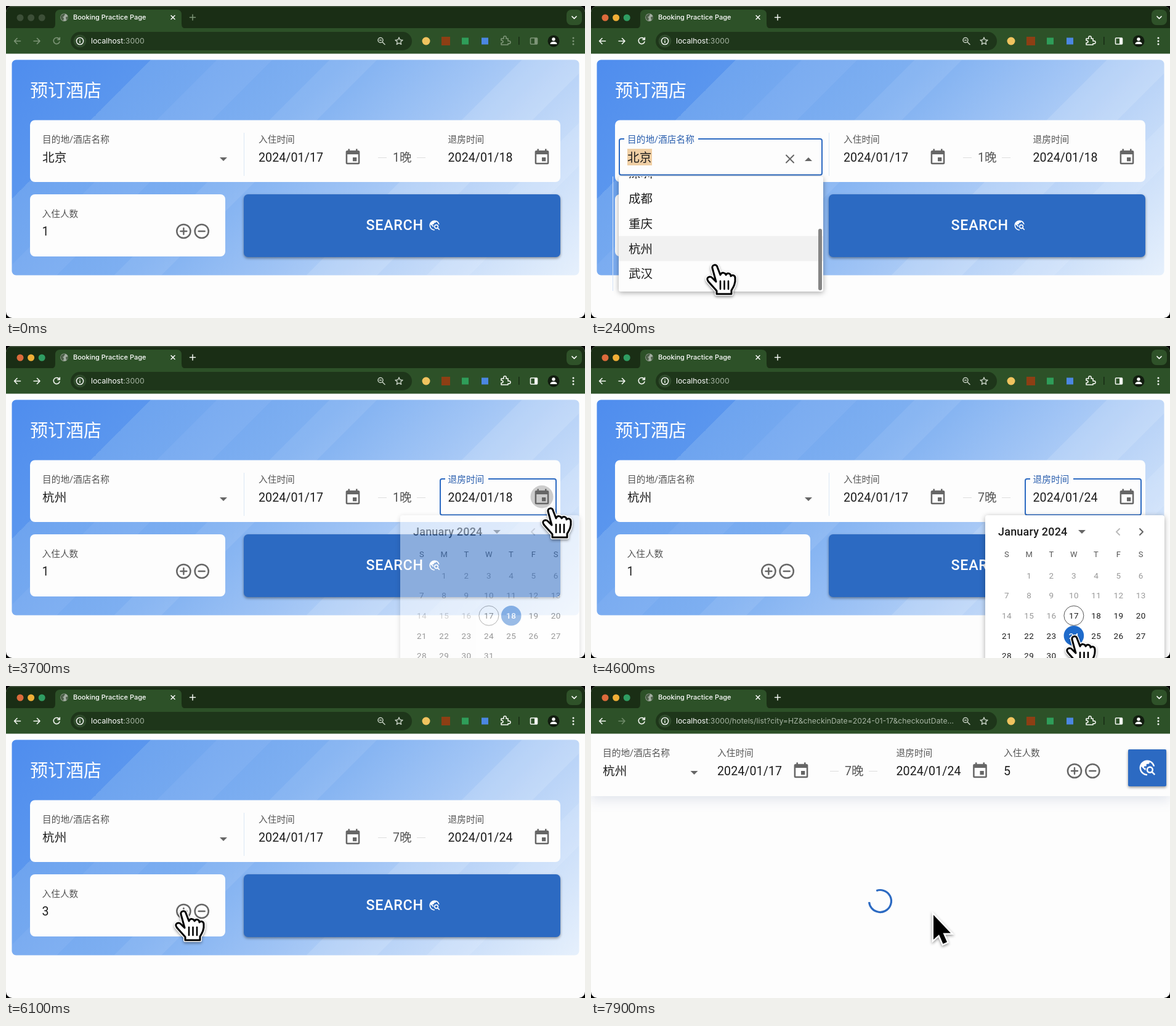
Recreate the animation shown at these times as an HTML page. Size 940 by 507 pixels, loop 8 s.

```html
<!DOCTYPE html>
<html lang="zh-CN">
<head>
<meta charset="utf-8">
<style>
html, body { margin: 0; width: 100%; height: 100%; overflow: hidden; background: #000 }
svg { display: block; width: 100vw; height: 100vh; border-radius: 10px;
  font-family: Roboto, "Noto Sans CJK SC", "Noto Sans CJK", sans-serif }
.ui { font-family: Inter, sans-serif }
.line { fill: none; stroke-linecap: round; stroke-linejoin: round }
.lift { filter: drop-shadow(0 2px 2px #0006) }
.paper { filter: drop-shadow(0 2px 4px #0005) }
</style>
</head>
<body>
<svg id="stage" viewBox="0 0 940 507"></svg>
<script>
const LOOP = 8000, BLUE = '#2c6ac2', GREY = '#666', INK = '#1c1c1c', WHITE = '#fdfdfd';
const cities = ['北京', '上海', '广州', '深圳', '成都', '重庆', '杭州', '武汉'];

// [time, x, y] of the pointer's hot spot
const track = [[100, 420, 480], [900, 218, 270], [1000, 218, 270], [1200, 205, 350], [1400, 205, 350],
  [1600, 199, 380], [2100, 199, 380], [2400, 200, 421], [2700, 202, 398], [2900, 202, 398],
  [3400, 868, 246], [3600, 872, 250], [3700, 883, 264], [4400, 784, 472], [4700, 784, 472],
  [5300, 478.5, 330.5], [5600, 287, 366], [6600, 287, 366], [7000, 544, 361], [7100, 571, 380], [7300, 556, 372]];
const shapes = [[0, 'arrow'], [1000, 'beam'], [1100, 'hand'], [2900, 'arrow'], [3400, 'hand'], [4800, 'arrow'],
  [5100, 'hand'], [5500, 'arrow'], [5600, 'hand'], [6700, 'arrow'], [6800, 'hand'], [7200, 'arrow']];
const scrolling = [[1700, 0], [1900, 154]];
const fading = [[3500, 0], [3700, .45], [3900, 1], [4600, 1], [4900, 0]];
const guests = [[0, 1], [5800, 2], [6000, 3], [6200, 4], [6500, 5]];

const EVENT = 'M17 12h-5v5h5zM16 1v2H8V1H6v2H5a2 2 0 0 0-2 2v14a2 2 0 0 0 2 2h14a2 2 0 0 0 2-2V5a2 2 0 0 0-2-2h-1V1zm3 18H5V8h14z';
const EXPLORE = 'M19.3 16.9c.4-.7.7-1.5.7-2.4 0-2.5-2-4.5-4.5-4.5S11 12 11 14.5s2 4.5 4.5 4.5c.9 0 1.7-.3 2.4-.7l3.2 3.2 1.4-1.4zm-3.8.1a2.5 2.5 0 1 1 0-5 2.5 2.5 0 0 1 0 5zM12 20v2C6.5 22 2 17.5 2 12S6.5 2 12 2c4.8 0 8.9 3.4 9.8 8h-2.1c-.6-2.5-2.4-4.5-4.7-5.4V5a2 2 0 0 1-2 2h-2v2c0 .6-.4 1-1 1H8v2h2v3H9l-4.8-4.8C4.1 10.8 4 11.4 4 12c0 4.4 3.6 8 8 8z';
const HAND = 'M-3 5C-4-1 4-2 5 3L10 16C12 11 18 12 19 16C21 12 27 13 27 18C30 15 34 17 34 21C35 30 31 36 28 41V47H4V42C0 37-6 31-10 26C-14 20-7 17-3 21L3 27Z';
const BEAM = 'M-9-23Q0-23 0-15V15Q0 23-9 23M9-23Q0-23 0-15M9 23Q0 23 0 15M-4 0H4';

const latest = (list, t) => list.filter(k => k[0] <= t).pop()[1];
function tween(keys, t, i = 1) {
  const n = keys.findIndex(k => k[0] > t);
  if (n < 0) return keys[keys.length - 1][i];
  if (!n) return keys[0][i];
  const a = keys[n - 1], b = keys[n];
  return a[i] + (b[i] - a[i]) * (t - a[0]) / (b[0] - a[0]);
}

const rect = (x, y, w, h, fill, r = 0, more = '') =>
  `<rect x="${x}" y="${y}" width="${w}" height="${h}" rx="${r}" fill="${fill}" ${more}/>`;
const disc = (x, y, r, fill, more = '') => `<circle cx="${x}" cy="${y}" r="${r}" fill="${fill}" ${more}/>`;
const line = (d, color, w = 1.6) => `<path class="line" d="${d}" stroke="${color}" stroke-width="${w}"/>`;
const text = (x, y, size, s, fill = INK, more = '') =>
  `<text x="${x}" y="${y}" font-size="${size}" fill="${fill}" ${more}>${s}</text>`;
const icon = (d, x, y, k, fill) => `<path transform="translate(${x} ${y}) scale(${k}) translate(-12 -12)" d="${d}" fill="${fill}"/>`;
const caret = (x, y, up) => `<path d="M${x - 6} ${y + (up ? 3 : -3)}h12l-6 ${up ? -6 : 6}z" fill="${GREY}"/>`;
const calendar = (x, y) => icon(EVENT, x, y + 1, 1.26, GREY);

function field(x, y, label, value, focused) {
  return text(x, y + 5.3, 14.7, label, focused ? '#2b5fae' : '#555') +
    text(x, y + 35.7, 19.6, value, INK, 'letter-spacing=".08"');
}
function outline(x, w, gap, gapWidth) {
  return rect(x + 1, 216, w - 2, 58.5, 'none', 3, `stroke="${BLUE}" stroke-width="2"`) + rect(gap, 214, gapWidth, 4, WHITE);
}
function nights(x, y, n) {
  return rect(x - 24, y, 14, 1, '#ddd') + rect(x + 39, y, 14, 1, '#ddd') + text(x, y + 7, 19.6, n + '晚', '#555');
}
function stepper(x, y) {
  const ring = cx => disc(cx, y, 11.1, 'none', `stroke="${GREY}" stroke-width="2.5"`);
  return ring(x) + ring(x + 29.3) + line(`M${x - 5} ${y}h10m-5-5v10M${x + 24.3} ${y}h10`, GREY, 2.4);
}

function browser(t, done) {
  const on = t >= 1000, c = on ? '#f4f7f2' : '#7d9577', off = '#6f8a69';
  const lights = on ? ['#dc6a3c', '#f0ae37', '#2f9c62'] : Array(3).fill('#3d4f38');
  const url = ':3000' + (done ? '/hotels/list?city=HZ&amp;checkinDate=2024-01-17&amp;checkoutDate...' : '');
  return rect(0, 0, 940, 37, '#1a2e15') + rect(0, 0, 940, 1.4, '#4b5a47') +
    `<path d="M72 37q8 0 8-8V14q0-8 8-8h189q8 0 8 8v15q0 8 8 8z" fill="#2d5128"/>` +
    rect(0, 36, 940, 41.5, '#2d5128') +
    lights.map((f, i) => disc(23 + 17.6 * i, 19, 5.5, f)).join('') +
    disc(94.5, 18.5, 6.3, '#a3ada1') +
    `<path d="M89 16q5-5 7-3l-2 4-2 1 2 2-1 4q-5-2-4-8zM97 18l4-1q0 4-3 6z" fill="#4c5f48"/>` +
    text(109, 22.3, 11, 'Booking Practice Page', '#fff', 'class="ui" font-weight="500"') +
    line('M268 15.5l6 6m0-6l-6 6', '#fff', 1.5) + line('M298.5 18.5h9m-4.5-4.5v9', c, 1.5) +
    rect(910, 6, 25, 25, '#2f5229', 8) + line('M919 17l3.5 3.5 3.5-3.5', '#fff', 1.7) +
    line('M23.5 57h-10m4.5-4.5l-4.5 4.5 4.5 4.5', c) +
    line('M45 57h10m-4.5-4.5l4.5 4.5-4.5 4.5', done ? off : c) +
    line('M86.5 54a5 5 0 1 0 .5 4M87.3 51.3v3.5h-3.5', c) +
    rect(105, 42, 554, 30, '#1e361a', 15) + disc(120, 57, 10.5, '#2f4b2b') +
    disc(120, 57, 5.6, 'none', 'stroke="#fff" stroke-width="1.4"') + line('M120 56.5v3M120 54.2v.1', '#fff', 1.4) +
    text(138, 61, 12.25, `localhost<tspan fill="#a7b5a3">${url}</tspan>`, '#fff', 'class="ui"') +
    disc(608, 55.5, 4, 'none', 'stroke="#c6d0c3" stroke-width="1.5"') + line('M611 58.5l4 4M606.5 55.5h3', '#c6d0c3', 1.5) +
    line('M638 51l1.7 4 4.3.4-3.3 2.8 1 4.2-3.7-2.2-3.7 2.2 1-4.2-3.3-2.8 4.3-.4z', '#c6d0c3', 1.4) +
    disc(682, 57, 6.5, '#f0c35f') + rect(707, 50, 14, 14, '#8d3f14') +
    rect(740, 51.5, 11, 11, '#2f9d59') + rect(772, 51.5, 11, 11, '#4b87e2') +
    line('M804 53h4q-1-4 2-4t2 4h3v4q4-1 4 2t-4 2v2h-11v-3q3 0 3-2t-3-2z', c, 1.6) +
    rect(832, 50, 1.5, 13, '#182b14') +
    rect(851.5, 52, 11, 10, 'none', 1, `stroke="${c}" stroke-width="1.6"`) + rect(858, 52, 5, 10, c) +
    disc(889, 57, 9.5, '#111c0f') + disc(889, 54, 2.7, '#fff') + '<path d="M883.5 62q0-4 5.5-4t5.5 4z" fill="#fff"/>' +
    [52, 57, 62].map(y => disc(921, y, 1.5, c)).join('');
}

// Colour and bands run along x + y: [sum, colour] and [start, end, strength]
const sky = [[97, '#4f8dee'], [323, '#5a96ee'], [323, '#6ea4ef'], [640, '#7fb0f1'], [870, '#a0c4f5'], [1019, '#b7d2f7'], [1369, '#e6f0fc']];
const bands = [[430, 520, .05], [613, 690, .08], [925, 1040, .13], [1120, 1190, .1]];
const hero = '<defs><linearGradient id="sky" gradientUnits="userSpaceOnUse" x1="9" y1="88" x2="645" y2="724">' +
  sky.map(([s, c]) => `<stop offset="${(s - 97) / 1272}" stop-color="${c}"/>`).join('') + `</linearGradient>
<clipPath id="panel">${rect(9.5, 87.5, 921, 350, '#000', 7)}</clipPath>
<clipPath id="menu">${rect(45, 277, 332, 187, '#000', 3)}</clipPath></defs><g clip-path="url(#panel)">` +
  rect(9, 87, 922, 351, 'url(#sky)') +
  bands.map(([a, b, o]) => `<path d="M${a - 87} 87H${b - 87}L${b - 438} 438H${a - 438}z" fill="#fff" opacity="${o}"/>`).join('') + '</g>' +
  text(39, 148, 29, '预订酒店', '#fff');

function cityMenu(t) {
  const top = tween(scrolling, t), hover = t < 1100 ? 0 : t < 1400 ? 1 : t < 1800 ? 2 : 6;
  const rows = cities.map((city, i) => {
    const y = 304 + 40.7 * i - top, bg = i == 0 ? '#dfe8f3' : i == hover ? '#f1f1f1' : 'none';
    return rect(45, y - 20.35, 332, 40.7, bg) + text(61, y + 7.3, 19.5, city);
  }).join('');
  return rect(35, 277, 1, 186, '#d3e2f7') + rect(45, 277, 332, 187, WHITE, 3, 'class="paper"') +
    `<g clip-path="url(#menu)">${rows}${t >= 1800 ? rect(369, 278 + 84 * top / 154, 6, 100, '#858585', 3) : ''}</g>`;
}

function datePopup(opacity, picked) {
  const mid = 'text-anchor="middle" letter-spacing=".4"';
  let out = rect(640, 275, 291, 310, '#fff', 4, 'class="paper"') +
    text(661, 308, 18, 'January 2024', INK, 'font-weight="500" letter-spacing=".2"') + caret(797, 302) +
    line('M858 297l-5 5 5 5', '#bbb', 2) + line('M891 297l5 5-5 5', GREY, 2);
  [...'SMTWTFS'].forEach((d, i) => out += text(675 + 36.3 * i, 343, 13, d, '#555', mid));
  for (let d = 1; d <= 31; d++) {
    const x = 675 + 36.3 * (d % 7), y = 373 + 32.6 * (d / 7 | 0);
    if (d == picked) out += disc(x, y, 16.3, '#1f6bcb');
    else if (d == 17) out += disc(x, y, 16, 'none', 'stroke="#555"');
    out += text(x, y + 4.8, 13.5, d, d == picked ? '#fff' : d < 17 ? '#999' : INK, mid + (d == picked ? ' font-weight="500"' : ''));
  }
  return `<g opacity="${opacity}">${out}</g>`;
}

function home(t) {
  const choosing = t >= 1000 && t < 2900, dating = t >= 3400 && t < 4900, later = t >= 4600;
  const over = (t >= 5100 && t < 5500) || t >= 6800;
  const fade = tween(fading, t);
  return hero + rect(39, 185.5, 861, 100.5, WHITE, 8) + rect(386, 206, 1, 70, '#dbe7f5') +
    (choosing ? outline(45, 331, 54, 120) + rect(59, 232, 40, 27, '#f0cfa4') + line('M317 242.5l12 12m0-12l-12 12', GREY, 2) : '') +
    field(59, 217, '目的地/酒店名称', t < 2900 ? '北京' : '杭州', choosing) + caret(353, 249, choosing) +
    field(410, 217, '入住时间', '2024/01/17') + calendar(563, 245) + nights(628, 246, later ? 7 : 1) +
    (dating ? outline(704, 190, 713, 70) : '') + (t >= 3400 && t < 4000 ? disc(870, 245, 18.5, '#ccc') : '') +
    field(717.5, 217, '退房时间', later ? '2024/01/24' : '2024/01/18', dating) + calendar(870, 245) +
    rect(39, 306, 317, 101, WHITE, 8) + field(58.5, 337.5, '入住人数', latest(guests, t)) + stepper(288.4, 366) +
    rect(386, 306, 514, 102, t >= 6900 ? '#2558b0' : over ? '#2963bd' : BLUE, 7, 'class="lift"') +
    (t == 7100 ? disc(544, 361, 7.5, '#406fb0') : '') +
    text(584.5, 364.3, 23.3, 'SEARCH', '#fff', 'font-weight="500" letter-spacing=".7"') + icon(EXPLORE, 695.7, 356.5, .82, '#fff') +
    (choosing ? cityMenu(t) : '') + (fade ? datePopup(fade, later ? 24 : 18) : '');
}

function spinner(t) {
  const u = (t - 7130) / 1400 % 1, smooth = v => v * v * (3 - 2 * v);
  const a = smooth(Math.min(1, u * 2)), b = smooth(Math.max(0, u * 2 - 1));
  return `<g transform="translate(469.5 349.5) scale(.89) rotate(${360 * u})">` +
    disc(0, 0, 20.2, 'none', `stroke="${BLUE}" stroke-width="3.6" stroke-dasharray="${1 + 99 * a} 200" stroke-dashoffset="${-15 * a - 110 * b}"`) + '</g>';
}

function results(t) {
  return rect(0, 77, 940, 102, WHITE, 0, 'style="filter:drop-shadow(0 6px 10px #3c5a8c26)"') +
    field(19, 109, '目的地/酒店名称', '杭州') + caret(167.5, 141) +
    field(205, 109, '入住时间', '2024/01/17') + calendar(341, 137) + nights(412, 138, 7) +
    field(495.5, 109, '退房时间', '2024/01/24') + calendar(631.5, 137) +
    field(670, 109, '入住人数', '5') + stepper(785, 138) +
    rect(872, 103, 62, 60, BLUE, 2, 'class="lift"') + icon(EXPLORE, 903, 133, 1.25, '#fff') + spinner(t);
}

function pointer(t) {
  if (t < 100) return '';
  const art = {
    arrow: '<path d="M0 0V40L9 32L15.5 47L22 44L15.5 29.5H28Z" stroke="#fff" stroke-width="5" paint-order="stroke"/>',
    beam: line(BEAM, '#fff', 8) + line(BEAM, '#000', 4),
    hand: line(HAND, '#fff', 6) + `<path d="${HAND}" fill="#fff" stroke="#000" stroke-width="3" stroke-linejoin="round"/>` +
      line('M10 26v13M16.5 26v13M23 26v13', '#000', 2.6)
  };
  return `<g class="lift" transform="translate(${tween(track, t, 1)} ${tween(track, t, 2)})">${art[latest(shapes, t)]}</g>`;
}

const stage = document.getElementById('stage');
let shown = -1;
function draw() {
  const t = Math.floor(performance.now() % LOOP / 100) * 100;
  if (t != shown) {
    const done = t >= 7200;
    stage.innerHTML = rect(0, 0, 940, 507, WHITE) + (done ? results(t) : home(t)) + browser(t, done) + pointer(t);
    shown = t;
  }
  requestAnimationFrame(draw);
}
draw();
</script>
</body>
</html>
```
